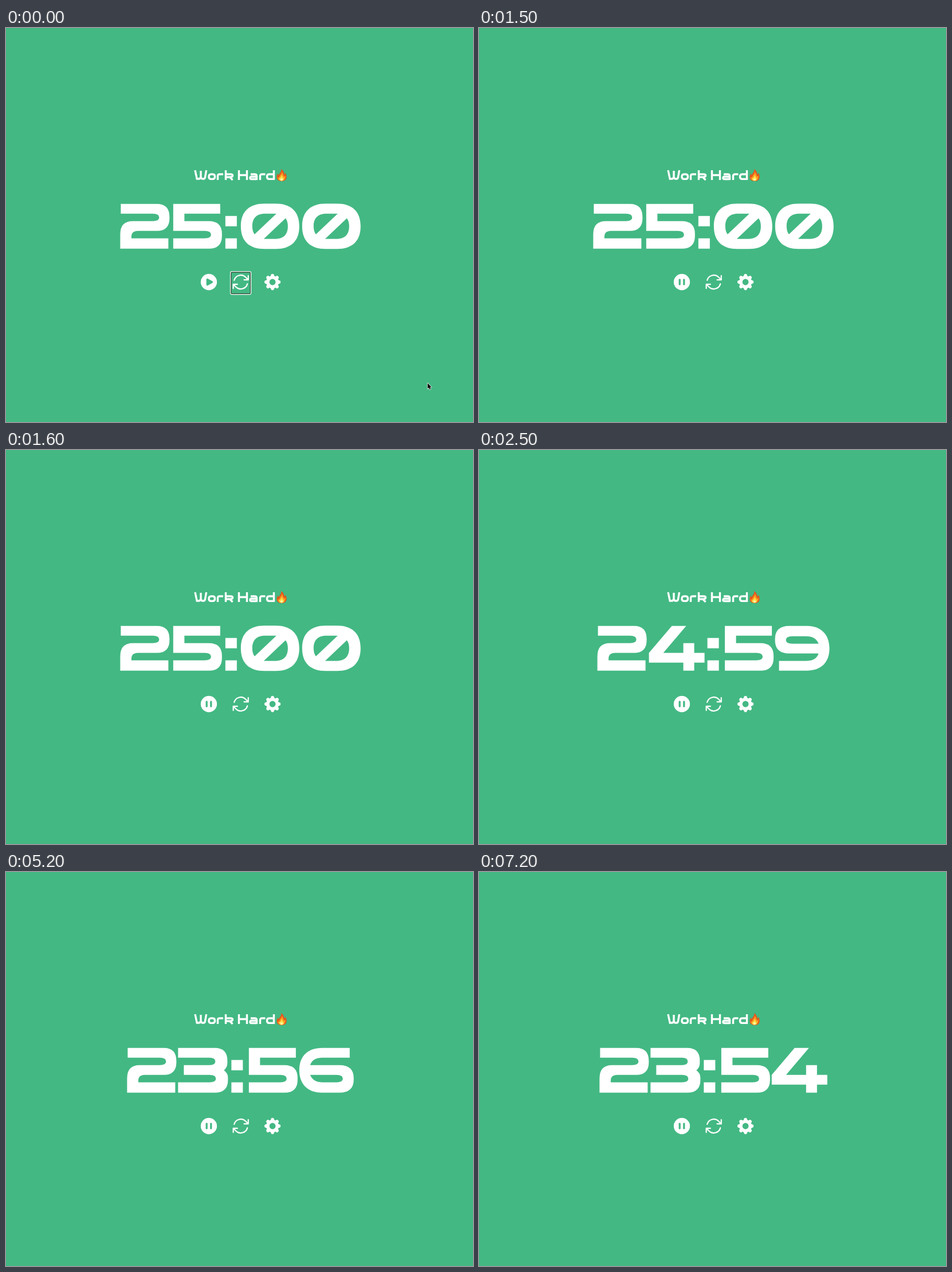
Write an HTML page with a canvas that moves like this. It is 815 px wide and 687 px high and loops after 8 s.

```html
<!DOCTYPE html>
<html lang="en">
<head>
<meta charset="utf-8">
<title>Work timer</title>
<style>
  html, body { margin: 0; width: 100%; height: 100%; overflow: hidden; background: #43b883; }
  canvas { display: block; }
</style>
</head>
<body>
<canvas id="stage" width="815" height="687" role="img" aria-label="Work Hard 🔥 countdown timer"></canvas>
<script>
const ctx = document.getElementById('stage').getContext('2d');
const W = 815, H = 687, LOOP = 8000, STEP = 50;
const GREEN = '#43b883', WHITE = '#fff';

// w: ink width, l / r: side bearings, d: outline in a 78px tall box
const glyph = (w, l, r, d, turned) => ({ w, l, r, turned, path: new Path2D(d) });
const SIX = 'M88 0V17H41Q23 17 19 30H70Q95 30 95 53V55Q95 78 70 78H39C14 78 0 62 0 39C0 14 15 0 40 0Z' +
  'M19 47Q24 60 41 60H65Q76 60 76 53.5Q76 47 65 47Z';
const GLYPHS = {
  0: glyph(102, 0, 5, 'M0 39C0 12 16-.5 41-.5H61C86-.5 102 12 102 39C102 66 86 78.5 61 78.5H41C16 78.5 0 66 0 39Z' +
    'M20 39C20 24 28 17 43 17H62L24 53Q20 48 20 39ZM82 39C82 54 74 61 59 61H40L78 25Q82 30 82 39Z'),
  2: glyph(86.5, 0, 2.5, 'M1 0H64Q86 0 86 23V25Q86 47 64 47H31Q19.5 47 19.5 57V60H84V78H0V53Q0 30 22 30H57Q68 30 68 23.5Q68 17 57 17H1Z'),
  3: glyph(87, 0, 2, 'M0 0H64Q86 0 86 22V26Q86 34 80 39Q87 44 87 52V56Q87 78 64 78H0V60H55Q66 60 66 53.5Q66 47 55 47H10V30H55Q65 30 65 23.5Q65 17 55 17H0Z'),
  4: glyph(97, 1, 1, 'M40 0H65L25 47H60V30H79V47H97V64H79V78H60V64H0V47Z'),
  5: glyph(85, 3.5, 2, 'M0 0H82V17H19.5V30H62Q85 30 85 52V56Q85 78 62 78H0V60H55Q66 60 66 53.5Q66 47 55 47H0Z'),
  6: glyph(95, 1, 2, SIX),
  7: glyph(86, 1, 2, 'M0 0H88V17L38 78H12L62 17H0Z'),
  8: glyph(98.5, 1, 2, 'M22 0H76.5Q95 0 95 20V26Q95 34 90 38.5Q98.5 43 98.5 53V56Q98.5 78 76 78H22Q0 78 0 56V53Q0 43 8.5 38.5Q3.5 34 3.5 26V20Q3.5 0 22 0Z' +
    'M33 17Q22 17 22 23.5Q22 30 33 30H65.5Q76.5 30 76.5 23.5Q76.5 17 65.5 17Z' +
    'M31 47Q20 47 20 53.5Q20 60 31 60H67.5Q78.5 60 78.5 53.5Q78.5 47 67.5 47Z'),
  9: glyph(95, .5, 2, SIX, true),
  ':': glyph(20, 4, 7, 'M0 21H20V39H0ZM0 60H20V78H0Z')
};

const HEADING = new Path2D(
  'M330 248L333.2 263H336.5Q339.5 263 340 259V249M340 259Q340.5 263 343 263H345Q347 263 347.5 260L349.6 248' +
  'M358 255H361Q364.5 255 364.5 259.3Q364.5 263.4 361 263.4H357.5Q354 263.4 354 259.3Q354 255 358 255Z' +
  'M369.5 265V258Q369.5 255 373 255H379' +
  'M383.5 248V265M383.5 255H392Q395.5 255 395.5 257.3Q395.5 260 391 260H383.5M390.5 260L395.5 265' +
  'M406.5 248V265M420.5 248V265M406.5 256.5H420.5' +
  'M427 255H434Q437.5 255 437.5 258V265M437.5 263.5H428.5Q426 263.5 426 261.4Q426 259.3 428.5 259.3H437.5' +
  'M443.5 265V258Q443.5 255 447 255H452.5' +
  'M467.5 248V263.4H459Q455.5 263.4 455.5 259.3Q455.5 255 459 255H467.5');

const FLAME = [
  ['#e8541b', 'M480 246C486 249 484 253 486.5 256C487.2 254.5 487 253.5 486.8 252C489.5 255 490 258 489.5 261C489 265 485.5 267 481 267C476 267 472.8 264.5 472.5 260.5C472.3 257.5 473.5 255.5 475 253.5C475 255 475.2 256 476 256.8C477.5 252 481.5 251 480 246Z'],
  ['#fb9c20', 'M481 250.5C484 254 483.5 257 486 259C486.8 258.5 487.3 257.8 487.5 257C488.5 262 486 266.2 481 266.3C476.5 266.4 474 263.5 474.2 259.5C475 260.5 475.5 260.8 476.5 261C477.5 256 481.5 255 481 250.5Z'],
  ['#ffe04a', 'M480.8 256C483 258.5 482.5 260.5 484.2 261.5C485.8 264 484 266.5 481 266.5C477.5 266.5 476 264 477.2 261.8C479.5 260.5 480.8 259 480.8 256Z'],
  ['#fff3a8', 'M481 261.5C484 264 483.5 266.2 481 266.2C478.5 266.2 478.2 264 481 261.5Z']
].map(([color, d]) => [color, new Path2D(d)]);

// Icons on a 24-unit grid
const DISC = 'M12 2.25A9.75 9.75 0 1 1 12 21.75A9.75 9.75 0 1 1 12 2.25Z';
const bar = x => `M${x} 9Q${x} 8.25 ${x + .75} 8.25h.75q.75 0 .75 .75v6q0 .75-.75 .75h-.75q-.75 0-.75-.75Z`;
const PLAY = new Path2D(DISC + 'M16.27 11.02a1.125 1.125 0 0 1 0 1.966l-5.6 3.11A1.125 1.125 0 0 1 9 15.11V8.89c0-.857 .92-1.4 1.67-.983Z');
const PAUSE = new Path2D(DISC + bar(8.25) + bar(13.5));
const REPEAT = new Path2D('M16.02 9.35H21.015M2.985 19.64V14.65M2.985 14.65H7.98M2.985 14.65L6.165 17.835A8.25 8.25 0 0 0 19.97 14.135' +
  'M4.03 9.865A8.25 8.25 0 0 1 17.835 6.165L21.015 9.35M21.015 4.356V9.35');
const TOOTH = new Path2D('M9.3 5Q9.8 4.8 9.89 4.37L9.98 3.82Q10.25 2.25 11.83 2.25H12.17Q13.75 2.25 14.02 3.82L14.11 4.37Q14.2 4.8 14.7 5L12 12Z');
const ARROW = new Path2D('M0 0V9.8L2.2 7.7L3.7 11.2L5.3 10.5L3.9 7.1H6.9Z');

function disc(x, y, r, color) {
  ctx.fillStyle = color;
  ctx.beginPath();
  ctx.arc(x, y, r, 0, Math.PI * 2);
  ctx.fill();
}

function icon(cx, draw) {
  ctx.save();
  ctx.translate(cx, 443);
  ctx.scale(1.45, 1.45);
  ctx.translate(-12, -12);
  ctx.fillStyle = ctx.strokeStyle = WHITE;
  draw();
  ctx.restore();
}

function repeat() {
  ctx.lineWidth = 1.5;
  ctx.lineCap = ctx.lineJoin = 'round';
  ctx.stroke(REPEAT);
}

function gear() {
  for (let i = 0; i < 8; i++) {
    ctx.save();
    ctx.translate(12, 12);
    ctx.rotate(i * Math.PI / 4);
    ctx.translate(-12, -12);
    ctx.fill(TOOTH);
    ctx.restore();
  }
  disc(12, 12, 7.45, WHITE);
  disc(12, 12, 3.75, GREEN);
}

function heading() {
  ctx.strokeStyle = WHITE;
  ctx.lineWidth = 3.4;
  ctx.lineCap = 'butt';
  ctx.lineJoin = 'miter';
  ctx.stroke(HEADING);
  for (const [color, path] of FLAME) {
    ctx.fillStyle = color;
    ctx.fill(path);
  }
}

function clock(text) {
  const set = [...text].map(c => GLYPHS[c]);
  const gap = i => i ? set[i - 1].r + set[i].l : 0;
  const width = set.reduce((sum, g, i) => sum + gap(i) + g.w, 0);
  let x = 409.1 - width / 2;
  ctx.fillStyle = WHITE;
  set.forEach((g, i) => {
    x += gap(i);
    ctx.save();
    ctx.translate(x, 306.8);
    if (g.turned) {
      ctx.translate(g.w, 78);
      ctx.rotate(Math.PI);
    }
    ctx.fill(g.path, 'evenodd');
    ctx.restore();
    x += g.w;
  });
}

function outline(x, y, w, h, r, color) {
  ctx.strokeStyle = color;
  ctx.lineWidth = 1.2;
  ctx.beginPath();
  ctx.roundRect(x, y, w, h, r);
  ctx.stroke();
}

function focusRing() {
  outline(391.6, 424.6, 36, 40, 2.5, WHITE);
  outline(392.8, 425.8, 33.6, 37.6, 1.5, 'rgba(60,50,45,.85)');
}

function cursor([x, y]) {
  ctx.save();
  ctx.translate(x, y);
  ctx.lineJoin = 'round';
  ctx.lineWidth = 1.4;
  ctx.strokeStyle = WHITE;
  ctx.stroke(ARROW);
  ctx.fillStyle = '#000';
  ctx.fill(ARROW);
  ctx.restore();
}

function inspector() {
  ctx.fillStyle = 'rgba(111,168,220,.66)';
  ctx.fillRect(0, 0, W, H);
  ctx.save();
  ctx.shadowColor = 'rgba(0,0,0,.45)';
  ctx.shadowBlur = 3;
  ctx.fillStyle = WHITE;
  ctx.beginPath();
  ctx.roundRect(1.5, 670.5, 84, 22, 2);
  ctx.fill();
  ctx.restore();
  const label = (text, x, color, weight) => {
    ctx.font = `${weight} 9px "Liberation Sans", Arial, sans-serif`;
    ctx.fillStyle = color;
    ctx.fillText(text, x, 683.5);
  };
  label('body', 7.7, '#7b0f78', 'bold');
  label('1179', 36, '#5a5a5a', 'normal');
  label('×', 57.2, '#5a5a5a', 'normal');
  label('995', 63.8, '#5a5a5a', 'normal');
}

const mix = (a, b, p) => a + (b - a) * p;
const ease = p => p < .5 ? 2 * p * p : 1 - 2 * (1 - p) ** 2;

// [time, x, y]
const TRACK = [[0, 735.8, 619.3], [750, 352, 442], [900, 352, 442], [1200, 350, 444], [1500, 830, 560]];

function cursorAt(t) {
  const i = TRACK.findIndex(k => k[0] > t);
  if (i < 1) return null;
  const [a, b] = [TRACK[i - 1], TRACK[i]];
  const p = ease((t - a[0]) / (b[0] - a[0]));
  return [mix(a[1], b[1], p), mix(a[2], b[2], p)];
}

const TICKS = [[0, '25:00'], [2200, '24:59'], [3200, '24:58'], [4200, '24:57'],
  [5150, '23:57'], [5200, '23:56'], [6200, '23:55'], [7200, '23:54']];
const timeAt = t => TICKS.filter(k => k[0] <= t).pop()[1];

function draw(t) {
  const running = t >= 1200;
  ctx.fillStyle = GREEN;
  ctx.fillRect(0, 0, W, H);
  heading();
  clock(timeAt(t));
  icon(354, () => ctx.fill(running ? PAUSE : PLAY, 'evenodd'));
  icon(409.7, repeat);
  icon(465.1, gear);
  if (!running) focusRing();
  if (t >= 1550 && t < 1600) inspector();
  const spot = cursorAt(t);
  if (spot) cursor(spot);
}

const start = performance.now();
function frame() {
  const t = (performance.now() - start) % LOOP;
  draw(Math.floor(t / STEP) * STEP);
  requestAnimationFrame(frame);
}
frame();
</script>
</body>
</html>
```
